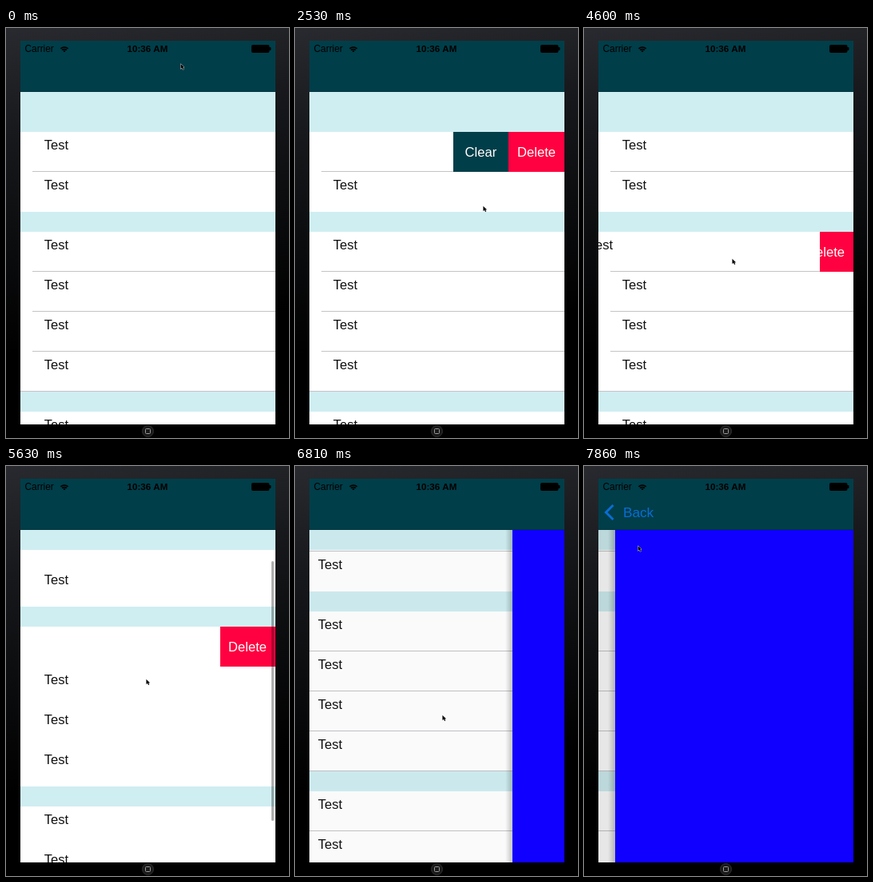
An HTML page with a canvas for the animation above (8000 ms loop, 354 by 513 pixels).

```html
<!DOCTYPE html>
<html lang="en">
<head>
<meta charset="utf-8">
<title>Swipeable table</title>
<style>
html, body { margin: 0; width: 354px; height: 513px; overflow: hidden; background: #000; }
canvas { display: block; }
</style>
</head>
<body>
<canvas id="stage" width="354" height="513"></canvas>
<script>
const ctx = document.getElementById('stage').getContext('2d');
const LOOP = 8000, FIRST = 435, STEP = 148.2, LAST = 50;
const L = 18, T = 16, R = 337, B = 496, NAV = 80, W = R - L;
const ROW = 50, HEAD = 25;
const TEAL = '#003e49', PALE = '#cfeef2', RED = '#ff0040', BLUE = '#1000ff', LINE = '#c4c4c7';
const FONT = '"Liberation Sans", Arial, sans-serif';

// Pointer stops: step, x, y
const PATH = [[-1, 218, 44], [5, 275, 145], [9, 200, 152], [14, 235, 222], [22, 240, 274],
  [28, 185, 288], [31, 174, 337], [33, 174, 337], [35, 175, 266], [43, 184, 311], [LAST, 67, 99]];

const clamp = v => Math.min(1, Math.max(0, v));
const ease = v => (v = clamp(v), v * v * (3 - 2 * v));

const swipe = (k, open, close, width) => width * (ease((k - open) / 3.4) - ease((k - close) / 2.6));
const scroll = k => 73 * (1 - Math.exp(-.67 * Math.max(0, k - 33)));

// Critically damped push
function push(k) {
  const u = .51 * Math.max(0, k - 41.37);
  return 1 - (1 + u) * Math.exp(-u);
}

function pointer(k) {
  const i = Math.max(1, PATH.findIndex(p => k <= p[0]));
  const [a, ax, ay] = PATH[i - 1], [b, bx, by] = PATH[i];
  const f = (k - a) / (b - a);
  return [ax + (bx - ax) * f, ay + (by - ay) * f].map(Math.round);
}

function rect(color, x, y, w, h) {
  ctx.fillStyle = color;
  ctx.fillRect(x, y, w, h);
}

function text(str, x, y, size, color, weight = '') {
  ctx.font = `${weight} ${size}px ${FONT}`;
  ctx.fillStyle = color;
  ctx.fillText(str, x, y);
}

function clip(x, y, w, h, draw) {
  ctx.save();
  ctx.beginPath();
  ctx.rect(x, y, w, h);
  ctx.clip();
  draw();
  ctx.restore();
}

function gradient(x0, y0, x1, y1, ...stops) {
  const g = ctx.createLinearGradient(x0, y0, x1, y1);
  stops.forEach((color, i) => g.addColorStop(i / (stops.length - 1), color));
  return g;
}

function bezel() {
  rect(gradient(0, 0, 60, 400, '#292a2f', '#17181b', '#0b0c0e', '#000'), 0, 0, 354, 513);
  ctx.lineWidth = 1;
  ctx.fillStyle = '#191919';
  ctx.strokeStyle = '#303030';
  ctx.beginPath();
  ctx.arc(177.5, 504.5, 7, 0, 7);
  ctx.fill();
  ctx.stroke();
  ctx.strokeStyle = '#999';
  ctx.beginPath();
  ctx.roundRect(174.5, 501.5, 6, 6, 1);
  ctx.stroke();
}

function row(y, shift, buttons) {
  rect('#fff', L, y, W, ROW);
  text('Test', 47.8 - shift, y + 22, 16.6, '#111');
  if (shift > 0) clip(R - shift, y, shift, ROW, () => {
    rect(RED, 267, y, 70, ROW);
    text('Delete', 278, y + 31, 16.6, '#fff');
    if (buttons < 2) return;
    rect(TEAL, 198, y, 69, ROW);
    text('Clear', 212.6, y + 31, 16.6, '#fff');
  });
}

function table(k) {
  const offset = scroll(k), moving = k > 33 && k < 41;
  const shifts = [swipe(k, 6, 19, 139), swipe(k, 26.05, 36, 69), 0];
  let y = NAV + HEAD - Math.round(offset);
  rect(PALE, L, NAV, W, B - NAV);
  [2, 4, 2].forEach((count, s) => {
    rect(PALE, L, y, W, HEAD);
    y += HEAD;
    for (let i = 0; i < count; i++, y += ROW) {
      const shift = i ? 0 : shifts[s], last = i === count - 1;
      row(y, shift, s ? 1 : 2);
      // Hairlines vanish while the list is moving
      const x = last ? L : 33;
      if (!moving && (!last || s)) rect(LINE, x, y + ROW - 1, R - x - shift, 1);
    }
  });
  rect(PALE, L, NAV, W, HEAD);
  const bar = ease(k - 33) - ease((k - 37) / 2);
  ctx.fillStyle = `rgba(0,0,0,${.32 * bar})`;
  ctx.beginPath();
  ctx.roundRect(332, 77 + .78 * offset, 3, 325, 1.5);
  ctx.fill();
}

function statusBar() {
  text('Carrier', 23.5, 30, 11.9, '#000');
  text('10:36 AM', 151.5, 30, 11.6, '#000', 'bold');
  ctx.strokeStyle = '#000';
  ctx.lineWidth = 1.7;
  for (let r = 1.5; r < 9; r += 2.5) {
    ctx.beginPath();
    ctx.arc(73, 30.5, r, -Math.PI * .75, -Math.PI * .25);
    ctx.stroke();
  }
  ctx.beginPath();
  ctx.roundRect(307, 21, 22.5, 10, 2);
  ctx.roundRect(329, 24, 2.5, 4, 1);
  ctx.fill();
}

function backButton(alpha) {
  ctx.globalAlpha = alpha;
  ctx.strokeStyle = '#0a70dc';
  ctx.lineWidth = 3;
  ctx.beginPath();
  ctx.moveTo(36.5, 49);
  ctx.lineTo(27.5, 58);
  ctx.lineTo(36.5, 67);
  ctx.stroke();
  text('Back', 49, 64, 17.2, '#0a70dc');
  ctx.globalAlpha = 1;
}

function cursor(x, y) {
  ctx.save();
  ctx.translate(x + .5, y + 1);
  ctx.scale(.8, .8);
  ctx.beginPath();
  [[0, 0], [0, 7.6], [1.9, 6], [3.2, 8.8], [4.6, 8.2], [3.4, 5.5], [5.6, 5.4]].forEach(p => ctx.lineTo(...p));
  ctx.closePath();
  ctx.lineWidth = 1.2;
  ctx.strokeStyle = '#ddd';
  ctx.stroke();
  ctx.fillStyle = '#000';
  ctx.fill();
  ctx.restore();
}

function draw(k) {
  const p = push(k), x = Math.round(R - W * p);
  bezel();
  clip(L, T, W, B - T, () => {
    ctx.save();
    ctx.translate(-Math.round(.3 * W * p), 0);
    table(k);
    ctx.restore();
    if (p > 0) {
      rect(`rgba(0,0,0,${.1 * p})`, L, NAV, W, B - NAV);
      rect(gradient(x - 9, 0, x, 0, 'rgba(0,0,0,0)', 'rgba(0,0,0,.22)'), x - 9, NAV, 9, B - NAV);
      rect(BLUE, x, NAV, R - x, B - NAV);
    }
    rect(TEAL, L, T, W, NAV - T);
    rect('#00343e', L, NAV - 1, W, 1);
    statusBar();
    backButton(clamp((p - .25) * 1.4));
  });
  cursor(...pointer(k));
}

// The picture advances in discrete steps
const start = performance.now();
function frame() {
  const t = (performance.now() - start) % LOOP;
  draw(Math.min(LAST, Math.max(-1, Math.floor((t - FIRST) / STEP))));
  requestAnimationFrame(frame);
}
frame();
</script>
</body>
</html>
```
